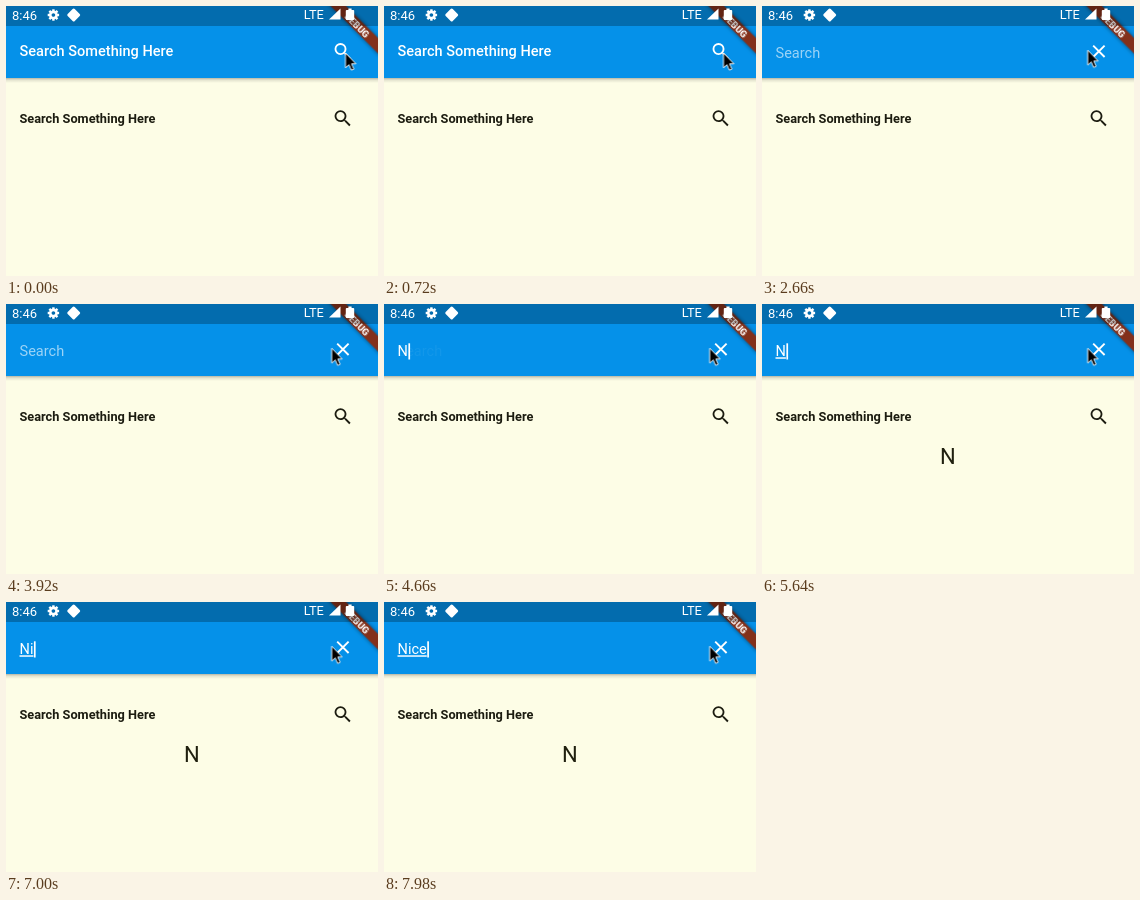
These frames come from a looping animation (372 px wide and 270 px high, 8000 ms). An HTML page:

```html
<!DOCTYPE html>
<html lang="en">
<head>
<meta charset="utf-8">
<title>Search bar</title>
<style>
  html, body { margin: 0; width: 100%; height: 100%; overflow: hidden; background: #fdfde6; }
  svg { display: block; width: 372px; height: 270px; font-family: Roboto, sans-serif; }
  .field { font-size: 14.56px; fill: #fff; }
  .composing { text-decoration: underline 1px; }
</style>
</head>
<body>
<svg viewBox="0 0 372 270">
  <defs>
    <linearGradient id="shade" x2="0" y2="1">
      <stop stop-color="#000" stop-opacity=".28"/>
      <stop offset=".4" stop-color="#000" stop-opacity=".1"/>
      <stop offset="1" stop-color="#000" stop-opacity="0"/>
    </linearGradient>
    <filter id="blur" x="-20%" y="-60%" width="140%" height="220%"><feGaussianBlur stdDeviation="2"/></filter>
    <path id="lens" d="M15.5 14h-.79l-.28-.27A6.47 6.47 0 0 0 16 9.5 6.5 6.5 0 1 0 9.5 16c1.61 0 3.09-.59 4.23-1.57l.27.28v.79l5 4.99L20.49 19zm-6 0a4.5 4.5 0 1 1 0-9 4.5 4.5 0 0 1 0 9z"/>
  </defs>

  <rect width="372" height="270" fill="#fdfde6"/>
  <rect y="72" width="372" height="5" fill="url(#shade)"/>
  <rect width="372" height="72" fill="#0591e9"/>

  <g id="idle">
    <text class="field" x="13.5" y="50" font-weight="500">Search Something Here</text>
    <use href="#lens" transform="translate(325.8 34.3) scale(.917)" fill="#fff"/>
  </g>
  <g id="active">
    <text id="hint" class="field" x="13.5" y="52.3">Search</text>
    <path d="M331.2 39.6l11.4 11.4m0-11.4l-11.4 11.4" stroke="#fff" stroke-width="1.9"/>
  </g>
  <g id="entry"></g>

  <text x="13.5" y="117.4" font-size="12.76" font-weight="700" fill="#1c1c10">Search Something Here</text>
  <use href="#lens" transform="translate(325.8 101.4) scale(.917)" fill="#1c1c10"/>
  <text id="result" x="185.8" y="160" font-size="22" text-anchor="middle" fill="#20200f">N</text>

  <g transform="translate(372 0) rotate(45)">
    <rect x="-37" y="22.6" width="74" height="10.9" fill="#000" opacity=".5" filter="url(#blur)"/>
    <rect x="-37" y="22.6" width="74" height="10.9" fill="#83301a"/>
    <text x="-1" y="31.5" font-size="9.4" font-weight="900" text-anchor="middle" fill="#fff">DEBUG</text>
  </g>

  <rect width="372" height="20" fill="#000" opacity=".25"/>
  <g fill="#fff">
    <text x="6" y="13.8" font-size="13">8:46</text>
    <text x="297.8" y="13.4" font-size="12.8">LTE</text>
    <g transform="translate(47.4 9)">
      <circle r="3.1" fill="none" stroke="#fff" stroke-width="2.6"/>
      <g id="teeth"></g>
    </g>
    <rect x="-5" y="-5" width="10" height="10" rx="1.5" transform="translate(67.7 9) rotate(45)"/>
    <path d="M334.5 2.5v11h-11.5z"/>
    <path d="M342.4 2.6h3.2v1.3h1.7q.9 0 .9.9v8.3q0 .9-.9.9h-6.6q-.9 0-.9-.9v-8.3q0-.9.9-.9h1.7z"/>
  </g>

  <g id="pointer">
    <path d="M0 0V14.8L3.5 11.7 5.9 17.2 8.4 16.1 6 10.8H10.4Z" fill="#000" stroke="#fff" stroke-width=".9" stroke-linejoin="round"/>
  </g>
</svg>
<script>
const LOOP = 8000, OPEN = 1440, BLINK = 500, LEFT = 13.5;
const $ = id => document.getElementById(id);

function make(tag, parent, attrs, text = '') {
  const el = document.createElementNS('http://www.w3.org/2000/svg', tag);
  for (const k in attrs) el.setAttribute(k, attrs[k]);
  el.textContent = text;
  return parent.appendChild(el);
}

// rows: [time, value, easing towards the next row]
function play(el, prop, rows, easing) {
  const last = rows[rows.length - 1];
  const frames = [...rows, [LOOP, last[1]]].map(([t, v, e]) =>
    ({ offset: t / LOOP, [prop]: v, easing: e || easing }));
  el.animate(frames, { duration: LOOP, iterations: Infinity });
}

const HOLD = 'steps(1, end)';

function show(el, spans) {
  const rows = spans[0][0] > 0 ? [[0, 0]] : [];
  for (const [from, to] of spans) {
    rows.push([from, 1]);
    if (to < LOOP) rows.push([to, 0]);
  }
  play(el, 'opacity', rows, HOLD);
}

function blinks(from, to) {
  const spans = [];
  for (let t = from; t < to; t += 2 * BLINK) spans.push([t, Math.min(t + BLINK, to)]);
  return spans;
}

for (let a = 0; a < 360; a += 45)
  make('rect', $('teeth'), { x: -1.2, y: -5.7, width: 2.4, height: 2.4, transform: `rotate(${a})` });

show($('idle'), [[0, OPEN]]);
show($('active'), [[OPEN, LOOP]]);
show($('result'), [[5140, LOOP]]);
play($('hint'), 'opacity', [[0, .6], [4480, .6], [4680, 0]], 'linear');

const typed = [['', 3000], ['N', 4480], ['Ni', 6860], ['Nic', 7180], ['Nice', 7500]];
typed.forEach(([word, from], i) => {
  const to = i + 1 < typed.length ? typed[i + 1][1] : LOOP;
  let end = LEFT;
  if (word) {
    const plainEnd = word === 'N' ? 4760 : from;
    const add = (cls, a, b) => {
      const el = make('text', $('entry'), { class: 'field ' + cls, x: LEFT, y: 52.3 }, word);
      show(el, [[a, b]]);
      return el;
    };
    if (plainEnd > from) add('', from, plainEnd);
    end += add('composing', plainEnd, to).getComputedTextLength();
  }
  const caret = make('rect', $('entry'), { x: end + .5, y: 39.3, width: 1.7, height: 16.2, fill: '#fff' });
  const spans = blinks(from, to);
  if (to === LOOP) spans[spans.length - 1][1] = LOOP;
  show(caret, spans);
});

play($('pointer'), 'transform', [
  [0, 'translate(339.5px, 47px)'],
  [1280, 'translate(339.5px, 47px)', 'ease-in-out'],
  [1500, 'translate(333.5px, 47px)'],
  [2140, 'translate(333.5px, 47px)', 'ease-in-out'],
  [2600, 'translate(325.7px, 44.2px)']
], 'linear');
</script>
</body>
</html>
```
